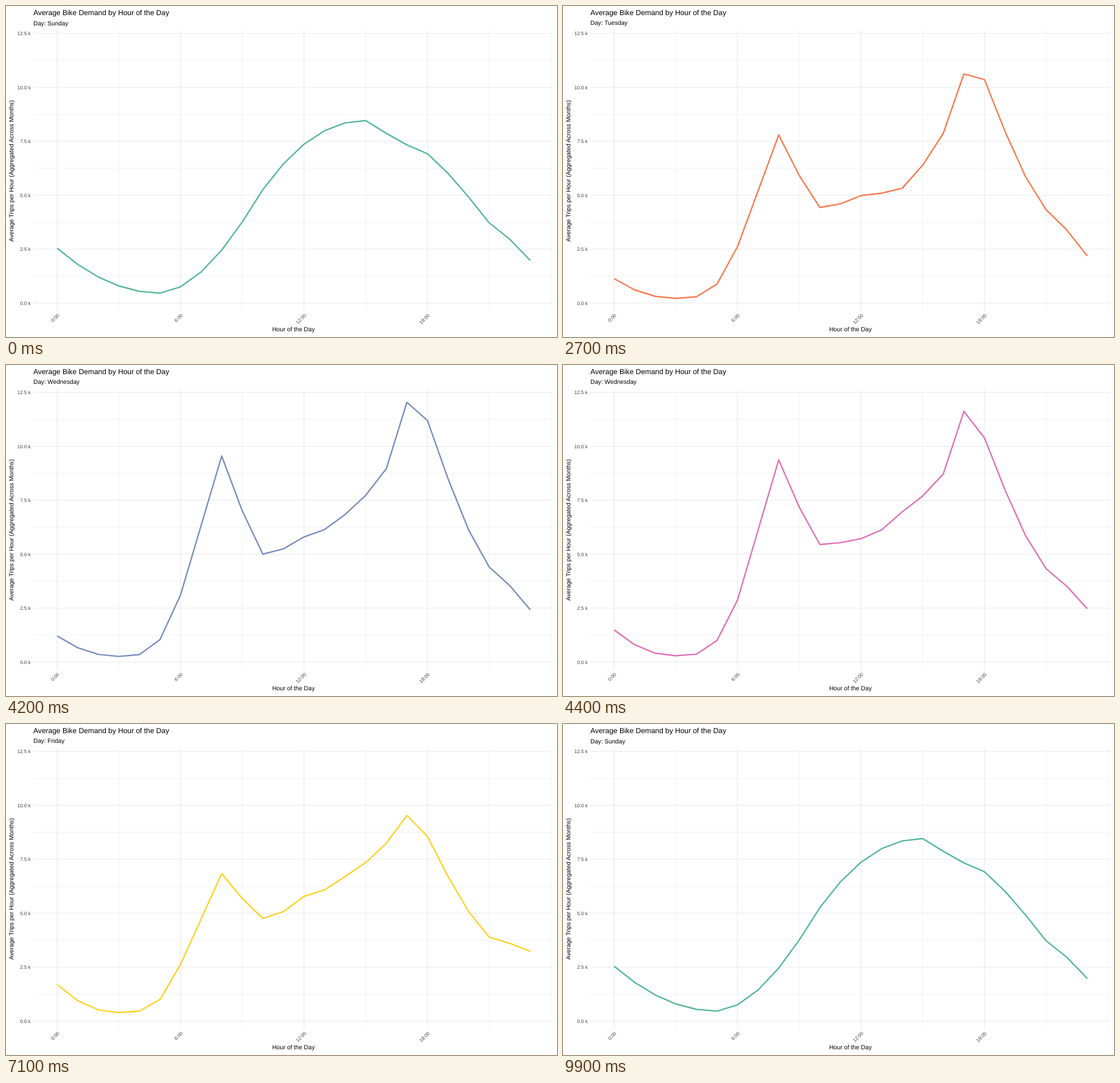
Recreate the animation shown at these times as an HTML page. Size 966 by 580 pixels, loop 10 s.

```html
<!DOCTYPE html>
<html lang="en">
<head>
<meta charset="utf-8">
<title>Average Bike Demand by Hour of the Day</title>
<style>
  html, body { margin: 0; width: 100%; height: 100%; overflow: hidden; background: #fff; }
  svg { display: block; }
  text { font: 10.67px "Liberation Sans", Arial, sans-serif; text-rendering: geometricPrecision; }
  .title { font-size: 12.8px; }
  .tick { font-size: 8.53px; fill: #414141; text-anchor: end; }
  .mid { text-anchor: middle; }
  .major { stroke: #e7e7e7; stroke-width: 1.1; }
  .minor { stroke: #e7e7e7; stroke-width: .6; }
  #line { fill: none; stroke-width: 2.4; stroke-linejoin: round; }
</style>
</head>
<body>
<svg width="966" height="580" viewBox="0 0 966 580">
  <g id="grid"></g>
  <polyline id="line"/>
  <g id="ticks"></g>
  <text class="title" x="48" y="15.6">Average Bike Demand by Hour of the Day</text>
  <text id="day" x="48"></text>
  <text class="mid" x="504" y="570.4">Hour of the Day</text>
  <text class="mid" transform="translate(13.2 289) rotate(-90)">Average Trips per Hour (Aggregated Across Months)</text>
</svg>
<script>
const LOOP = 10000, TITLE_LEAD = 200;
const LEFT = 48, RIGHT = 960, TOP = 42.5, BOTTOM = 534;
const hourX = h => 89.6 + h * 36.07;
const tripsY = k => 520.5 - k * 37.8;
const $ = id => document.getElementById(id);

const easeIn = p => u => u ** p;
const easeOut = p => u => 1 - (1 - u) ** p;
const linear = easeIn(1);

// A shape lists key hours, each with the easing that leads up to it
const weekdayShape = [
  [0], [3, easeOut(2.1)], [6, easeIn(3.2)], [8, linear], [10, easeOut(1.18)], [12, easeIn(1.7)],
  [14, easeIn(1.6)], [16, easeIn(1.25)], [17, linear], [18, linear], [21, easeOut(1.25)], [23, easeIn(1.2)]
];
const sundayShape = [
  [0], [5, easeOut(2)], [9, easeIn(1.75)], [15, easeOut(2.1)], [18, easeOut(1.2)],
  [21, easeIn(1.15)], [23, easeIn(1.2)]
];

// Thousands of trips at hour h, eased between the values at the key hours
const curve = (shape, ...values) => h => {
  const i = Math.max(1, shape.findIndex(([hour]) => hour >= h));
  const from = shape[i - 1][0], [to, ease] = shape[i];
  return values[i - 1] + (values[i] - values[i - 1]) * ease((h - from) / (to - from));
};
const weekday = (...values) => curve(weekdayShape, ...values);

const sunday = curve(sundayShape, 2.54, .46, 3.76, 8.46, 6.92, 3.72, 1.97);
// Saturday follows Sunday, a little busier and with a livelier evening
const saturday = h => sunday(h) * 1.0635 + Math.max(0, (h - 15) / 7.2) ** 3;

const days = [
  { name: 'Sunday', start: 0, color: '#52b796', trips: sunday },
  { name: 'Monday', start: 1400, color: '#fa784c',
    trips: weekday(1.13, .22, 2.62, 7.79, 4.43, 4.98, 5.32, 7.87, 10.62, 10.36, 4.32, 2.18) },
  { name: 'Tuesday', start: 2900, color: '#778bbf',
    trips: weekday(1.21, .26, 3.11, 9.55, 5, 5.8, 6.84, 8.96, 12.04, 11.2, 4.41, 2.42) },
  { name: 'Wednesday', start: 4400, color: '#e06fb5',
    trips: weekday(1.49, .29, 2.88, 9.37, 5.45, 5.72, 6.96, 8.72, 11.62, 10.39, 4.32, 2.47) },
  { name: 'Thursday', start: 5700, color: '#94d23f',
    trips: weekday(1.24, .24, 2.79, 9.43, 5.17, 5.75, 6.3, 8.14, 11.88, 11.54, 5.07, 2.82) },
  { name: 'Friday', start: 7100, color: '#ffd224',
    trips: weekday(1.69, .39, 2.63, 6.84, 4.76, 5.78, 6.7, 8.24, 9.53, 8.56, 3.89, 3.23) },
  { name: 'Saturday', start: 8500, color: '#deb77e', trips: saturday }
];
days.push({ ...days[0], start: 9900 });
for (const d of days)
  d.points = Array.from({ length: 24 }, (_, h) => `${hourX(h)},${tripsY(d.trips(h))}`).join(' ');

function buildAxes() {
  const grid = { minor: '', major: '' };
  let ticks = '';
  for (let i = 0; i <= 10; i++) {
    const k = i * 1.25, y = tripsY(k), type = i % 2 ? 'minor' : 'major';
    grid[type] += `<path class="${type}" d="M${LEFT} ${y}H${RIGHT}"/>`;
    if (type === 'major') ticks += `<text class="tick" x="43.2" y="${y + 3.1}">${k.toFixed(1)} k</text>`;
  }
  for (let h = 0; h <= 24; h += 3) {
    const x = hourX(h), type = h % 6 || h === 24 ? 'minor' : 'major';
    grid[type] += `<path class="${type}" d="M${x} ${TOP}V${BOTTOM}"/>`;
    if (type === 'major')
      ticks += `<text class="tick" transform="translate(${x + 4.3} 542.9) rotate(-45)">${h}:00</text>`;
  }
  $('grid').innerHTML = grid.minor + grid.major;
  $('ticks').innerHTML = ticks;
}

const dayAt = t => days.filter(d => d.start <= t).pop();

function draw(t) {
  // The subtitle names the next day shortly before its line appears
  const shown = dayAt(t), { name } = dayAt(t + TITLE_LEAD);
  $('line').setAttribute('points', shown.points);
  $('line').setAttribute('stroke', shown.color);
  $('day').textContent = 'Day: ' + name;
  $('day').setAttribute('y', name[0] === 'S' ? 34 : 33.1);
}

buildAxes();
draw(0);
const began = performance.now();
(function tick() {
  draw((performance.now() - began) % LOOP);
  requestAnimationFrame(tick);
})();
</script>
</body>
</html>
```
